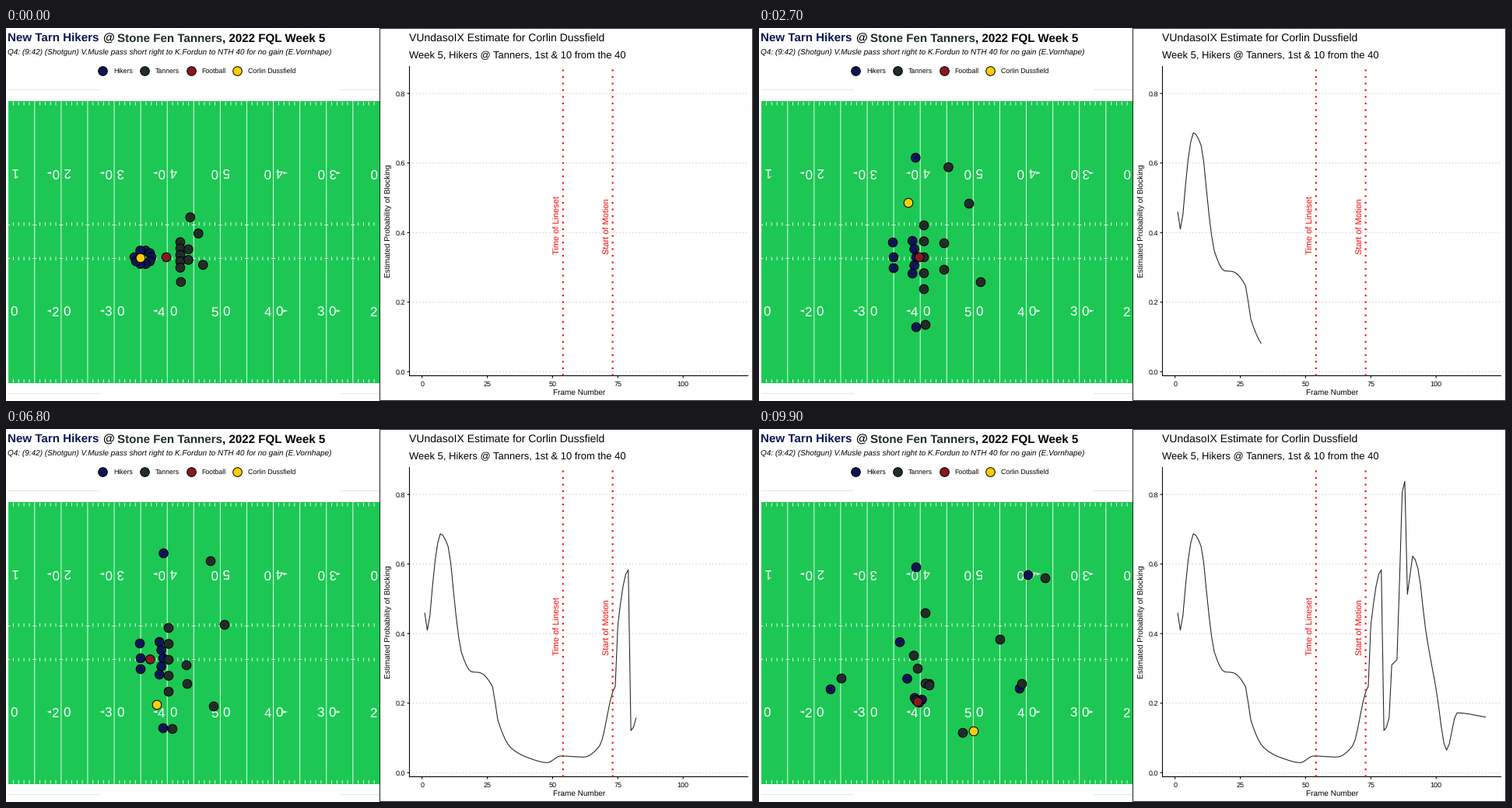
A matplotlib script for the animation above (10000 ms loop, 960x480 px).

```python
import numpy as np
import matplotlib
import matplotlib.pyplot as plt
from matplotlib.animation import FuncAnimation
from matplotlib.patches import Polygon, Rectangle

matplotlib.rcParams["font.family"] = "Liberation Sans"
matplotlib.rcParams["text.hinting"] = "none"

W, H, DPI = 960, 480, 80
PX = 72 / DPI  # points per pixel
FRAMES, ROWS = 100, 119

NAVY, SLATE, MAROON, GOLD = "#0b1656", "#1f2d2a", "#8c1720", "#ffcd05"
GREEN, PALE, CHALK = "#1cc853", "#d3efe4", "#e4f9ea"

fig = plt.figure(figsize=(W / DPI, H / DPI), dpi=DPI, facecolor="white")
ax = fig.add_axes([0, 0, 1, 1])
ax.set_xlim(0, W)
ax.set_ylim(H, 0)
ax.axis("off")


def label(x, y, s, size, color="black", ha="left", **kw):
    return ax.text(x, y, s, fontsize=size * PX, color=color, ha=ha,
                   va="baseline", rotation_mode="anchor", **kw)


def line(xs, ys, color="black", lw=1.0, **kw):
    return ax.plot(xs, ys, color=color, lw=lw * PX, snap=False,
                   solid_capstyle="butt", **kw)[0]


def box(x, y, w, h, **kw):
    ax.add_patch(Rectangle((x, y), w, h, snap=False, **kw))


def dots(xy, colors):
    return ax.scatter(*np.transpose(xy), s=(11.6 * PX) ** 2, c=colors,
                      edgecolors="black", linewidths=PX, zorder=8)


def glide(t, keys, vals):
    """Monotone cubic interpolation through (keys, vals)."""
    keys, vals = np.asarray(keys, float), np.asarray(vals, float)
    h = np.diff(keys)
    d = np.diff(vals) / h
    prod = d[:-1] * d[1:]
    total = d[:-1] + d[1:]
    m = np.concatenate([d[:1], np.zeros(len(d) - 1), d[-1:]])
    same = prod > 0
    m[1:-1][same] = 2 * prod[same] / total[same]
    i = np.clip(np.searchsorted(keys, t, "right") - 1, 0, len(h) - 1)
    s = (t - keys[i]) / h[i]
    return (vals[i] * (1 + 2 * s) * (1 - s) ** 2
            + vals[i + 1] * s ** 2 * (3 - 2 * s)
            + h[i] * s * (1 - s) * (m[i] * (1 - s) - m[i + 1] * s))


# ---- headings and legend ----
def text_width(s, **kw):
    t = label(0, 0, s, 15.1, **kw)
    w = t.get_window_extent().width
    t.remove()
    return w


done = ""
for part, color in [("New Tarn Hikers", NAVY), (" @", "black"),
                    (" Stone Fen Tanners", SLATE), (", 2022 FQL Week 5", "black")]:
    done += part
    part = part.strip()
    x = text_width(done, weight="bold") - text_width(part, weight="bold")
    label(2.5 + x, 18, part, 15.1, color, weight="bold")

label(2.5, 34, "Q4: (9:42) (Shotgun) V.Musle pass short right to K.Fordun to NTH 40 "
      "for no gain (E.Vornhape)", 10, style="italic")

for x, name, color in [(124, "Hikers", NAVY), (177.7, "Tanners", SLATE),
                       (237.5, "Football", MAROON), (297.2, "Corlin Dussfield", GOLD)]:
    label(x + 13.8, 58, name, 8.8)
    dots([(x, 54.8)], [color])


# ---- field ----
def yard_x(yard):
    return 207.2 + 6.818 * (yard - 40)


def arrow(x, y, side):
    ax.add_patch(Polygon([(x + 3 * side, y), (x - 2.5 * side, y - 1.8),
                          (x - 2.5 * side, y + 1.8)], fc="white", ec="none"))


box(2.5, 94, 477.5, 363, fc=GREEN, ec="none")
for y in (79.5, 470.5):
    line([3, 121.5], [y, y], PALE)
    line([430, 480], [y, y], PALE)

for yard in range(10, 80):
    x = yard_x(yard)
    if yard % 5 == 0:
        line([x, x], [94, 457], CHALK)
        for y in (253.5, 296.5):
            line([max(x - 2.5, 3), min(x + 2.5, 480)], [y, y], CHALK)
    else:
        for top in (95, 250, 294.5, 452):
            line([x, x], [top, top + 4.5], CHALK)

for yard in range(10, 90, 10):
    x, tens = yard_x(yard), str(min(yard, 100 - yard) // 10)
    for dx, low, high in ((-7.6, tens, "0"), (7.6, "0", tens)):
        if 5 < x + dx < 478:
            label(x + dx, 371, low, 17, "white", "center")
            label(x + dx, 180, high, 17, "white", "center", rotation=180)
    side = int(np.sign(yard - 50))
    if side and 10 < yard < 80:
        arrow(x + 15.4 * side, 364, side)
        arrow(x + 15.4 * side, 186.5, side)


# ---- chart ----
def cx(n):
    return 534.7 + 3.355 * n


def cy(v):
    return 442.3 - 447.6 * v


box(480.5, 0.5, 479, 479, fc="white", ec="#222222", lw=PX, zorder=2)
label(518.5, 17, "VUndasoIX Estimate for Corlin Dussfield", 14, zorder=3)
label(518.5, 39, "Week 5, Hikers @ Tanners, 1st & 10 from the 40", 13, zorder=3)

for v in (0, 0.2, 0.4, 0.6, 0.8):
    line([518.5, 954], [cy(v)] * 2, "#bebebe", 1.07, ls=(0, (1, 3)), zorder=3)
    line([515.5, 518.5], [cy(v)] * 2, lw=1.07, zorder=4)
    label(513.5, cy(v) + 3.4, f"{v:.1f}", 9, ha="right", zorder=3)
for n in range(0, 101, 25):
    line([cx(n)] * 2, [447.5, 450.5], lw=1.07, zorder=4)
    label(cx(n), 460.5, str(n), 9, ha="center", zorder=3)
label(736.2, 471.8, "Frame Number", 10, ha="center", zorder=3)
label(493.6, 248.5, "Estimated Probability of Blocking", 10, ha="center",
      rotation=90, zorder=3)

for n, name in ((54, "Time of Lineset"), (73, "Start of Motion")):
    line([cx(n)] * 2, [447.5, 49], "red", 2.13, ls=(0, (1, 3)), zorder=6)
    label(cx(n) - 4, 291, name, 11, "red", rotation=90, zorder=6)

line([518.5, 518.5], [49, 448], lw=1.07, zorder=4)
line([518, 954], [447.5, 447.5], lw=1.07, zorder=4)

# turning points of the estimate: (row, probability)
turns = [(1, .46), (2, .41), (5, .61), (7, .687), (10, .65), (13, .452), (15, .348),
         (19, .29), (22, .288), (27, .247), (29, .152), (34, .072), (41, .042),
         (48, .029), (53, .048), (62, .045), (68, .077), (73, .232), (74, .248),
         (75, .425), (79, .583), (80, .121), (82, .158), (83, .31), (85, .325),
         (87, .805), (88, .838), (89, .513), (91, .623), (93, .588), (96, .41),
         (100, .24), (104, .065), (108, .172), (119, .16)]
rows = np.arange(1, ROWS + 1)
prob = glide(rows, *np.transpose(turns))
curve = line([], [], "#1d2626", 1.07, zorder=5, solid_joinstyle="round")

# ---- players ----
SET, SNAP, BREAK, END = 44, 68, 80, FRAMES - 1
t = np.arange(FRAMES)
paths, colors = [], []


def add(color, path):
    paths.append(path)
    colors.append(color)
    return path


def route(start, spot, pace, moves, hold=SET):
    """Walk from start to spot at a steady pace, then glide through moves."""
    start, spot = np.array(start, float), np.array(spot, float)
    gone = np.minimum(1, pace * t / np.hypot(*(spot - start)))
    walk = start + gone[:, None] * (spot - start)
    points = np.array([spot, *moves.values()])
    late = np.transpose([glide(np.maximum(t, hold), [hold, *moves], p)
                         for p in points.T])
    return np.where(t[:, None] < hold, walk, late)


def offence(slot, spot, at_break, at_end, **extra):
    a = slot * np.pi / 5
    huddle = (176 + 11 * np.cos(a), 295 + 9 * np.sin(a))
    return add(NAVY, route(huddle, spot, 4.5,
                           {SNAP: spot, BREAK: at_break, **extra.get("then", {}),
                            END: at_end}))


def defence(spot, shift, at_break, at_end):
    spot, hub = np.array(spot), np.array((232, 290))
    add(SLATE, route(hub + 0.4 * (spot - hub), spot, 2.4,
                     {SNAP: spot + shift, BREAK: at_break, END: at_end}))


# receivers, blockers falling back then flowing to the ball, passer
offence(8, (202.5, 160), (285, 160), (346, 188))
offence(2, (202, 385), (277, 354), (335, 334))
for i in range(5):
    offence((i + 9) % 10, (202 - 2.4 * abs(i - 2), 295 + 10.5 * (i - 2)),
            (163 + 7 * i, 268 + 14 * i),
            (181 + 9.5 * i, 350 - 11.2 * (i - 2.6) ** 2))
passer = offence(5, (173, 295), (139, 291), (92, 335), then={88: (90, 320)})

# five rushers, the middle one chasing the passer
for i in range(5):
    y = 254 + 20.5 * i
    end = (106, 321) if i == 2 else (199 + 5 * i, 330 - 2.4 * (4 - i) ** 2)
    defence((212, y), (-3, 2), (167 + 14 * (i % 2), 295 + 0.83 * (y - 295)), end)

# linebackers and safeties slide with the motion, corners stay with receivers
defence((238, 277), (-6, 27), (235, 251), (214, 237))
defence((238, 311), (-5, 17), (227, 332), (202, 349))
defence((270, 226), (11, 26), (300, 231), (310, 271))
defence((285, 327), (-18, 30), (261, 407), (262, 391))
defence((244, 174), (19, -4), (303, 171), (368, 192))
defence((214, 382), (0, 4), (273, 360), (338, 328))

# running backs
offence(7, (172, 276), (168, 234), (202, 178))
catcher = offence(4, (173, 309), (179, 330), (206, 352))

# the ball is snapped to the passer, then thrown to the catcher
snap = np.clip((t - 63) / 7, 0, 1)[:, None]
throw = np.clip((t - 87) / 6, 0, 1)[:, None]
ball = (206, 295) + snap * (passer + (4, 2) - (206, 295))
add(MAROON, ball + throw * (catcher - (2, 1) - ball))

add(GOLD, route((173, 296), (192, 225), 3.7,
                {SET: (191, 268), 60: (191, 268), SNAP: (194, 355),
                 BREAK: (241, 409), END: (276, 389)}, hold=30))

paths = np.array(paths)
team = dots(paths[:, 0], colors)


def update(k):
    last = 1 + int((k + 0.5) * (ROWS - 1) / (FRAMES - 1))
    curve.set_data(cx(rows[:last]), cy(prob[:last]))
    team.set_offsets(paths[:, k])
    return curve, team


anim = FuncAnimation(fig, update, frames=FRAMES, interval=100, repeat=True,
                     repeat_delay=0, blit=False)
plt.show()
```
